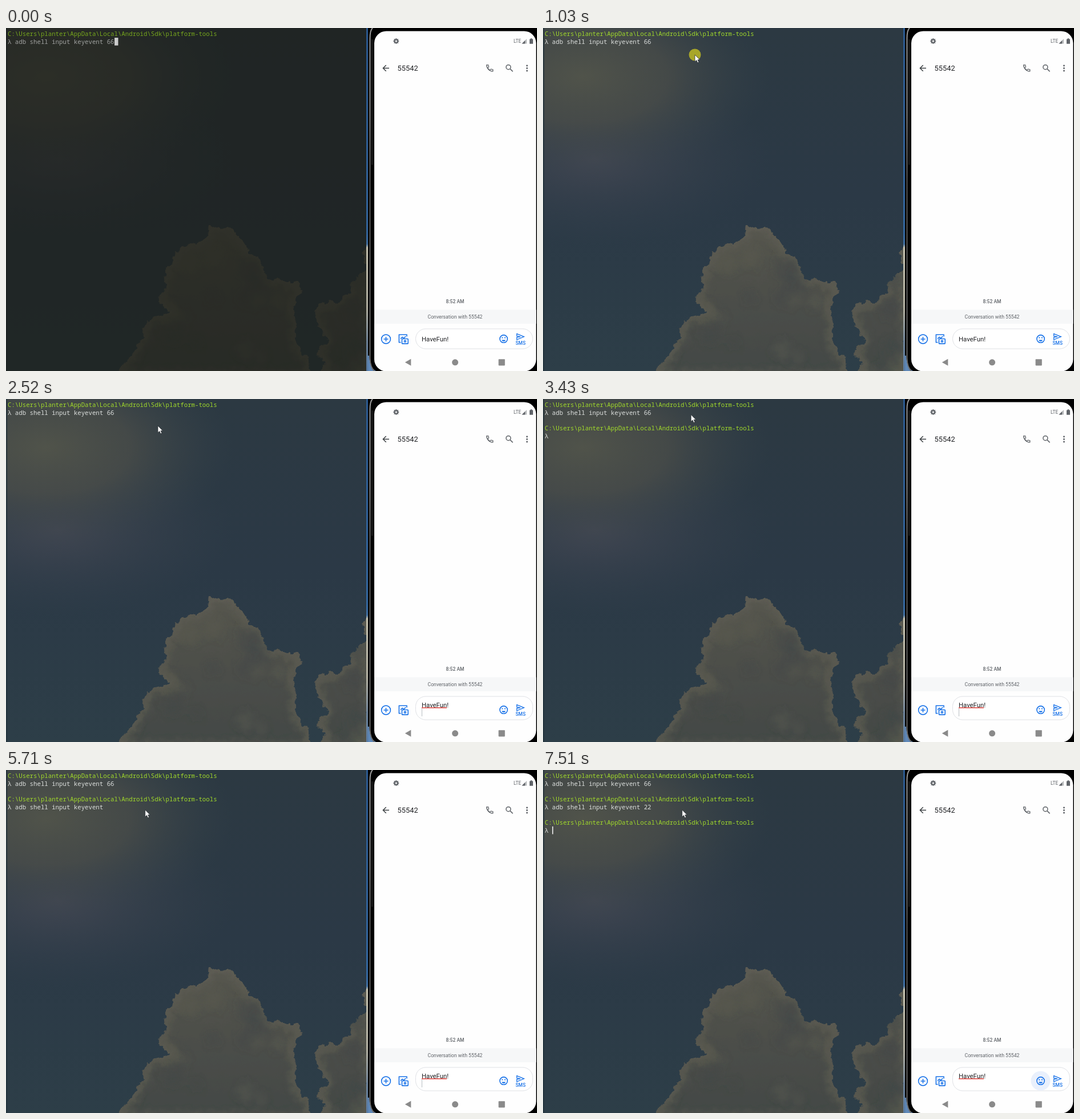
These frames come from a looping animation (930 by 602 pixels, 8 s). An HTML page:

```html
<!DOCTYPE html>
<html lang="en">
<head>
<meta charset="utf-8">
<title>Terminal and phone</title>
<style>
html, body { margin: 0; width: 100%; height: 100%; overflow: hidden; background: #000; }
svg { display: block; width: 930px; height: 602px; }
text { white-space: pre; }
.mono { font: 10.73px "Noto Sans Mono", "DejaVu Sans Mono", monospace; }
.ui { font-family: Roboto, "Open Sans", sans-serif; }
.line { fill: none; stroke: #5f6368; stroke-width: 1.5; }
.blue { fill: none; stroke: #1a73e8; stroke-width: 1.6; }
</style>
</head>
<body>
<svg viewBox="0 0 930 602" xmlns="http://www.w3.org/2000/svg">
  <defs>
    <linearGradient id="sky" x2="0" y2="1">
      <stop offset="0" stop-color="#2c3942"/><stop offset=".5" stop-color="#2b3946"/><stop offset="1" stop-color="#2d3e48"/>
    </linearGradient>
    <radialGradient id="haze"><stop offset="0" stop-color="#50534a"/><stop offset=".45" stop-color="#4a4d49" stop-opacity=".8"/><stop offset="1" stop-color="#36424a" stop-opacity="0"/></radialGradient>
    <radialGradient id="mauve"><stop offset="0" stop-color="#474a55" stop-opacity=".8"/><stop offset="1" stop-color="#37414d" stop-opacity="0"/></radialGradient>
    <linearGradient id="cloudFill" x2="0" y2="1">
      <stop offset="0" stop-color="#56564f"/><stop offset=".5" stop-color="#4c4e49"/><stop offset="1" stop-color="#424845"/>
    </linearGradient>
    <linearGradient id="edge" x2="0" y2="1">
      <stop offset="0" stop-color="#2f66a8"/><stop offset=".6" stop-color="#3a77bb"/><stop offset=".63" stop-color="#4a82c0"/>
      <stop offset=".64" stop-color="#e6e2cd"/><stop offset=".82" stop-color="#cfccbc"/><stop offset=".92" stop-color="#7e98b5"/><stop offset="1" stop-color="#5f88b8"/>
    </linearGradient>
    <linearGradient id="metal" x2="0" y2="1">
      <stop offset="0" stop-color="#9b9b9b"/><stop offset=".25" stop-color="#8a8a8a"/><stop offset=".45" stop-color="#555"/><stop offset="1" stop-color="#6a6a6a"/>
    </linearGradient>
    <filter id="ragged" x="-5%" y="-5%" width="110%" height="110%">
      <feTurbulence type="fractalNoise" baseFrequency=".07" numOctaves="4" seed="5"/>
      <feDisplacementMap in="SourceGraphic" scale="15" xChannelSelector="R" yChannelSelector="G"/>
    </filter>
    <filter id="soft" x="-30%" y="-30%" width="160%" height="160%"><feGaussianBlur stdDeviation="7"/></filter>
    <path id="cloud" d="M185 612L215 580L228 556L242 545L238 526L256 507L288 500L271 484L269 468L280 453L276 432L291 415L300 391L318 380L336 379L352 369L356 349L371 346L387 349L400 357L409 371L421 379L425 395L441 400L451 415L456 440L476 442L495 446L512 446L516 460L505 476L503 492L510 520L506 545L515 568L530 580L536 612ZM542 612L560 588L545 572L560 548L551 526L542 508L541 492L556 483L581 480L600 465L607 446L622 432L635 418V612ZM636 380L628 392L626 412L636 418Z"/>
    <clipPath id="cloudClip"><use href="#cloud"/></clipPath>
    <clipPath id="deskClip"><path d="M0 0H632V602H0Z"/></clipPath>
  </defs>

  <rect width="930" height="602"/>
  <g clip-path="url(#deskClip)">
    <rect width="632" height="602" fill="url(#sky)"/>
    <ellipse cx="90" cy="230" rx="310" ry="150" fill="url(#mauve)"/>
    <ellipse cx="70" cy="85" rx="330" ry="180" fill="url(#haze)"/>
    <g filter="url(#ragged)">
      <g clip-path="url(#cloudClip)">
        <use href="#cloud" fill="url(#cloudFill)"/>
        <use href="#cloud" fill="none" stroke="#605e54" stroke-width="18" filter="url(#soft)" opacity=".75"/>
        <g id="puffs" filter="url(#soft)"></g>
      </g>
    </g>
    <rect width="2.5" height="602" fill="#22333c" opacity=".65"/>
    <rect id="dim" width="632" height="602" fill="#1b1d17" opacity=".67"/>
  </g>
  <g id="terminal" class="mono"></g>
  <rect id="bar"/>

  <rect x="631.3" width="2.4" height="602" fill="url(#edge)"/>
  <path d="M633.7 575V602H648Q637 597 636 575Z" fill="#5f88b8"/>
  <path d="M642 0Q637.5 4 637.5 18V580Q638 595 645 602" fill="none" stroke="url(#metal)" stroke-width="2"/>
  <path d="M641 20V240" stroke="#3c3c3c"/>

  <g class="ui">
    <rect x="645" y="5.5" width="283.5" height="597" rx="21" fill="#fefefe"/>
    <g fill="#5f6368">
      <g id="gear" transform="translate(683.3 23)"><circle r="2.6" fill="none" stroke="#5f6368" stroke-width="2"/></g>
      <text x="889" y="26" font-size="8.4">LTE</text>
      <path d="M903.5 27.5L912 19V27.5Z" opacity=".45"/><path d="M903.5 27.5L909 22V27.5Z"/>
      <path d="M917 19.5h1.7v-1.3h2.6v1.3h1.7v8.3h-6z"/>
      <circle cx="912.5" cy="66" r="1.5"/><circle cx="912.5" cy="70.5" r="1.5"/><circle cx="912.5" cy="75" r="1.5"/>
    </g>
    <path class="line" stroke-width="1.6" d="M671 70.5H660.5M665.7 65.2L660.4 70.5L665.7 75.8" style="stroke:#3c4043"/>
    <text x="685.5" y="75.2" font-size="12.9" fill="#202124">55542</text>
    <path class="line" style="stroke-width:1.3" transform="translate(847.3 70.4)" d="M-5.6-5.6h3l.8 3.4-1.9 1.9a11 11 0 0 0 3.9 3.9l1.9-1.9 3.4.8v3c-6.2 0-11.1-4.9-11.1-11.1z"/>
    <circle class="line" cx="879.9" cy="68.7" r="4"/><path class="line" d="M882.8 71.6L887.6 76.4"/>

    <g id="history" text-anchor="middle" fill="#5f6368">
      <text x="786.5" y="483.3" font-size="8.5" font-weight="500">8:52 AM</text>
      <rect x="645" y="494.5" width="283.5" height="24.5" fill="#f6f7f8"/>
      <text x="786.5" y="510.2" font-size="8.7">Conversation with 55542</text>
    </g>

    <rect id="pill" x="717.5" width="205" rx="17.5" fill="#fff" stroke="#dfe1e5"/>
    <circle id="ripple" cx="871.5" cy="545.5" r="17" fill="#e9f0fc"/>
    <text id="message" x="728" font-size="11.35" fill="#202124">HaveFun!</text>
    <rect id="typo" x="728" y="541.2" width="44" height="1.5" fill="#e0443e"/>
    <rect id="caret" width="1" fill="#b9bdc3"/>

    <g class="blue">
      <circle cx="665.5" cy="546" r="7.9"/><path d="M665.5 542V550M661.5 546H669.5"/>
      <path d="M691.5 551.8H688.4V538.2H702V541.5M691 545.5L694 542.5L697 544.5L700 541"/>
      <rect x="693.5" y="545.5" width="10.7" height="8.6" rx=".8"/><circle cx="698.9" cy="549.8" r="1.5"/>
      <circle cx="871.6" cy="545.6" r="6.7"/><path d="M868 547.4a3.8 3.8 0 0 0 7.2 0z" fill="#1a73e8" stroke="none"/>
      <path d="M894.6 536.6L907.3 541.8L894.6 547V542.9L901 541.8L894.6 540.7Z" stroke-width="1.3"/>
    </g>
    <g fill="#1a73e8">
      <circle cx="869.2" cy="543.6" r="1.1"/><circle cx="874" cy="543.6" r="1.1"/>
      <text x="901.3" y="556.3" text-anchor="middle" font-size="8.4" font-weight="500">SMS</text>
    </g>
    <g fill="#8a8a8a">
      <path d="M698.8 586.8L709.3 580.8V592.8Z"/><circle cx="786.6" cy="586.8" r="5.5"/><rect x="862.6" y="581.2" width="11.2" height="11.2" rx=".8"/>
    </g>
  </g>

  <circle id="click" cx="266" cy="47" r="10.5" fill="#a8a62a"/>
  <path id="mouse" d="M0 0V12.2L2.8 9.6L4.8 14L6.9 13.1L5 8.8H8.6Z" fill="#fff" stroke="#20262a" stroke-width=".7"/>
</svg>

<script>
const LOOP = 8000, ROW = 13.66, CELL = 6.44, LEFT = 3;
const PATH = "C:\\Users\\planter\\AppData\\Local\\Android\\Sdk\\platform-tools";
const NS = "http://www.w3.org/2000/svg";
const el = id => document.getElementById(id);
const set = (node, attrs) => { for (const k in attrs) node.setAttribute(k, attrs[k]); };
const show = (node, on) => set(node, { visibility: on ? "visible" : "hidden" });
const add = (parent, tag, attrs) => {
  const node = document.createElementNS(NS, tag);
  set(node, attrs);
  return parent.appendChild(node);
};
const within = (t, ranges) => ranges.some(([a, b]) => t >= a && t < b);
// Last entry whose start time has passed.
const latest = (t, keys) => keys.filter(k => t >= k[0]).pop();
// Progress from 0 to 1 in a fixed number of held positions.
const stepped = (t, from, to, count) =>
  Math.max(0, Math.min(1, Math.floor((t - from) / (to - from) * (count - 1) + .001) / (count - 1)));
const mix = (a, b, p) => a + (b - a) * p;

// Soft light and shade inside the clouds
let seed = 11;
const random = () => (seed = seed * 16807 % 2147483647) / 2147483647;
for (let i = 0; i < 34; i++) add(el("puffs"), "circle", {
  cx: 200 + random() * 430, cy: 360 + random() * 240, r: 8 + random() * 15,
  fill: i % 2 ? "#5b5b51" : "#3f4645", opacity: .45
});
for (let i = 0; i < 8; i++) add(el("gear"), "rect", {
  x: -1, y: -4.9, width: 2, height: 2, transform: `rotate(${i * 45})`
});

const rows = Array.from({ length: 8 }, (_, i) =>
  add(el("terminal"), "text", { x: LEFT, y: 14 + i * ROW }));

const FIRST = "adb shell input keyevent 66";
const SECOND = [
  [0, ""], [4140, FIRST], [4920, FIRST.slice(0, -1)], [5070, FIRST.slice(0, -2)],
  [5790, FIRST.slice(0, -2) + "2"], [6010, FIRST.slice(0, -2) + "22"]
];
// Start time, row and column of the terminal cursor; column -1 hides it.
const CURSOR = [
  [0, 1, 29], [1030, 1, -1], [1110, 1, 29], [1580, 1, -1], [2050, 2, 0], [2520, 2, -1],
  [2750, 4, 2], [3280, 4, -1], [3760, 4, 2], [4140, 4, 29], [4700, 4, -1],
  [4920, 4, 28], [5070, 4, 27], [5640, 4, -1], [5790, 4, 28], [6010, 4, 29],
  [6490, 4, -1], [6720, 5, 0], [7270, 5, -1], [7510, 7, 2]
];
const CARET = [[1430, 1880], [2200, 2750], [3240, 3790], [4230, 4700], [5240, 5720], [6260, 6720]];

function drawTerminal(t) {
  const focused = t >= 1030;
  const lines = [PATH, "λ " + FIRST];
  if (t >= 2750) lines[3] = PATH, lines[4] = "λ " + latest(t, SECOND)[1];
  if (t >= 7440) lines[6] = PATH;
  if (t >= 7510) lines[7] = "λ";
  rows.forEach((row, i) => {
    row.textContent = lines[i] || "";
    const isPath = i % 3 === 0;
    set(row, { fill: focused ? (isPath ? "#a0d92b" : "#dcdfdd") : (isPath ? "#76a61d" : "#a0a2a0") });
  });
  show(el("dim"), !focused);
  const [, row, col] = latest(t, CURSOR);
  show(el("bar"), col >= 0);
  set(el("bar"), {
    x: LEFT + .3 + Math.max(col, 0) * CELL, y: 3.4 + row * ROW,
    width: focused ? 1.6 : 6.4, height: 13.6, fill: focused ? "#f0f0f0" : "#cbcbcb"
  });
}

function drawPhone(t) {
  const tall = t >= 2200;
  const lift = 6 * stepped(t, 2120, 2440, 5);
  set(el("history"), { transform: `translate(0 ${-lift})` });
  set(el("pill"), { y: tall ? 522 : 528, height: tall ? 41 : 35 });
  set(el("message"), { y: tall ? 540.6 : 550.2 });
  show(el("typo"), t >= 2360);
  set(el("caret"), { x: tall ? 728 : 775, y: tall ? 543 : 538, height: tall ? 14 : 15 });
  show(el("caret"), within(t, CARET));
  show(el("ripple"), t >= 7270);
}

function drawMouse(t) {
  let x, y;
  if (t < 2970) {
    const p = 1 - (1 - stepped(t, 180, 880, 10)) ** 2;
    x = mix(821, 266, p);
    y = mix(590, 47, p);
  } else {
    const p = stepped(t, 2893, 3510, 9);
    x = mix(266, 243.7, p) + 14 * Math.sin(Math.PI * p);
    y = mix(47, 70, p) - 52 * Math.sin(Math.PI * p);
  }
  set(el("mouse"), { transform: `translate(${x} ${y})` });
  show(el("mouse"), t >= 180);
  show(el("click"), t >= 1030 && t < 1110);
}

function frame() {
  const t = performance.now() % LOOP;
  drawTerminal(t);
  drawPhone(t);
  drawMouse(t);
  requestAnimationFrame(frame);
}
frame();
</script>
</body>
</html>
```
